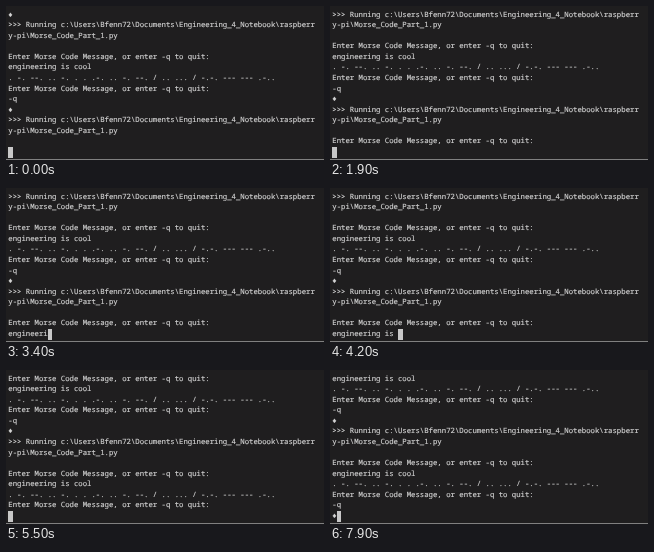
Animation of 318x154 px, one loop 8000 ms. Source, as an HTML page:

```html
<!DOCTYPE html>
<html lang="en">
<head>
<meta charset="utf-8">
<title>Morse code terminal</title>
<style>
  html, body { margin: 0; width: 100%; height: 100%; overflow: hidden; background: #1f1e1f; }
  #screen {
    position: absolute; left: 2.3px; top: 3.7px; margin: 0;
    font: 7.31px/10.55px "Noto Sans Mono", "Liberation Mono", monospace;
    font-variant-ligatures: none;
    text-rendering: geometricPrecision;
    -webkit-text-stroke: .15px #d4d4d4;
    color: #d4d4d4; white-space: pre;
  }
  #cursor { position: absolute; top: 141px; width: 4.6px; height: 11px; background: #c8c8c8; }
  #edge { position: absolute; left: 0; right: 0; top: 153px; height: 1px; background: #808080; }
</style>
</head>
<body>
<pre id="screen"></pre>
<div id="cursor"></div>
<div id="edge"></div>
<script>
const LOOP = 8000, ROWS = 14, LEFT = 2.3, CHAR = 4.386;
const screenEl = document.getElementById('screen');
const cursorEl = document.getElementById('cursor');

const run = [
  '>>> Running c:\\Users\\Bfenn72\\Documents\\Engineering_4_Notebook\\raspberr',
  'y-pi\\Morse_Code_Part_1.py',
  ''
];
const prompt = 'Enter Morse Code Message, or enter -q to quit:';
const message = 'engineering is cool';
const morse = '. -. --. .. -. . . .-. .. -. --. / .. ... / -.-. --- --- .-..';
const done = '♦';
const history = [done, ...run, prompt, message, morse, prompt, '-q', done, ...run];

// Text typed so far, one key every `step` ms
const typed = (text, t, start, step) =>
  text.slice(0, Math.max(0, Math.floor((t - start) / step)));

// Terminal contents; the last line holds the cursor
function linesAt(t) {
  if (t < 1700) return [...history, ''];
  if (t < 5100) return [...history, prompt, typed(message, t, 1960, 145)];
  const answered = [...history, prompt, message, morse, prompt];
  if (t < 7200) return [...answered, typed('-q', t, 6200, 350)];
  return [...answered, '-q', t < 7500 ? '' : done];
}

function draw(now) {
  const lines = linesAt(now % LOOP);
  const text = lines.slice(-ROWS).join('\n');
  if (screenEl.textContent !== text) screenEl.textContent = text;
  cursorEl.style.left = LEFT + lines[lines.length - 1].length * CHAR + 'px';
}

const begin = performance.now();
function tick() {
  draw(performance.now() - begin);
  requestAnimationFrame(tick);
}
tick();
</script>
</body>
</html>
```
